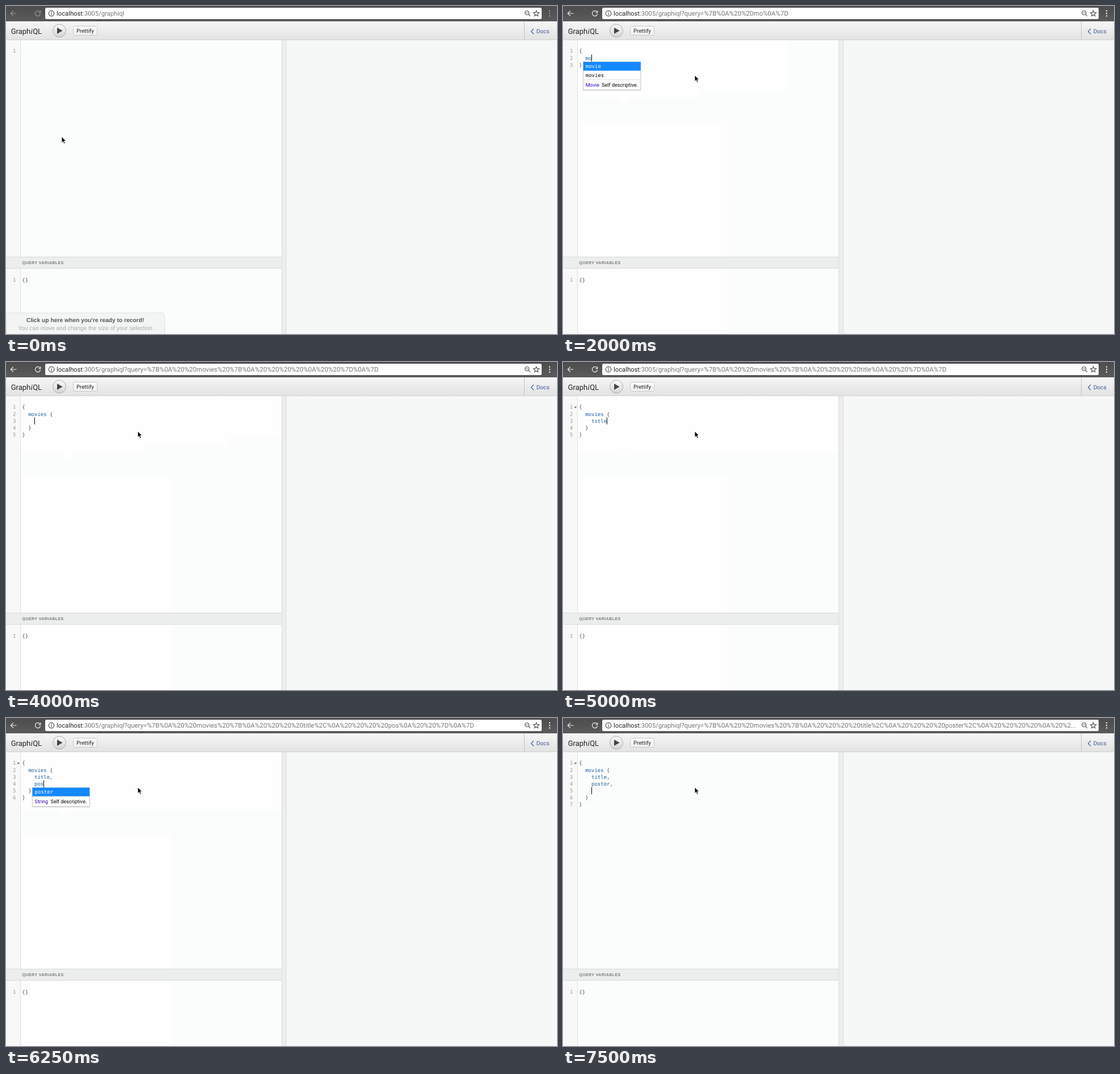
Animation, 970 px wide and 577 px high, one loop 8000 ms. Source, as an HTML page:

```html
<!DOCTYPE html>
<html lang="en">
<head>
<meta charset="utf-8">
<title>GraphiQL</title>
<style>
  html, body { margin: 0; width: 100%; height: 100%; overflow: hidden; background: #f6f8f8; }
  svg { display: block; width: 970px; height: 577px; text-rendering: geometricPrecision; }
  text { white-space: pre; font-family: Roboto, sans-serif; }
  .mono { font: 9px "DejaVu Sans Mono", monospace; fill: #555; }
  .num { fill: #999; text-anchor: end; }
  .field { fill: #1f61a0; }
  .hint { font: 10.25px "Liberation Sans", Arial, sans-serif; text-anchor: middle; }
  .line { fill: none; stroke-width: 1.2; }
</style>
</head>
<body>
<svg viewBox="0 0 970 577" xmlns="http://www.w3.org/2000/svg">
  <defs>
    <linearGradient id="chrome" x2="0" y2="1"><stop stop-color="#4c4c4c"/><stop offset="1" stop-color="#5b5b5b"/></linearGradient>
    <linearGradient id="bar" x2="0" y2="1"><stop stop-color="#f6f6f6"/><stop offset="1" stop-color="#e2e2e2"/></linearGradient>
    <linearGradient id="run" x2="0" y2="1"><stop stop-color="#fcfcfc"/><stop offset="1" stop-color="#d3d4d6"/></linearGradient>
    <linearGradient id="button" x2="0" y2="1"><stop stop-color="#fbfbfb"/><stop offset="1" stop-color="#f0f0f0"/></linearGradient>
  </defs>

  <!-- panes -->
  <rect width="970" height="577" fill="#f6f8f8"/>
  <rect y="60" width="485" height="517" fill="#fafdfb"/>
  <g id="wash" fill="#fdfefd"></g>
  <rect y="60" width="25" height="517" fill="#f7f8f7"/>
  <rect x="25" y="60" width="1" height="517" fill="#dfe1e0"/>
  <rect y="441" width="485" height="21" fill="#eceeed"/>
  <path d="M0 441.5H485M0 461.5H485" stroke="#d8dad9"/>
  <rect x="485" y="60" width="9" height="517" fill="#eceeed"/>
  <path d="M485.5 60V577M493.5 60V577" stroke="#dddfde"/>
  <text x="28.5" y="453.7" fill="#777" style="font:bold 7px 'Liberation Sans',Arial,sans-serif;letter-spacing:.45px">QUERY VARIABLES</text>
  <text class="mono num" x="17.3" y="484.7">1</text>
  <text class="mono" x="28.3" y="484.7">{}</text>

  <!-- browser bar -->
  <rect width="970" height="27" fill="url(#chrome)"/>
  <rect x="69" y="3" width="874" height="20" rx="2.5" fill="#fff"/>
  <g id="controls" class="line">
    <path d="M18.5 13H8.5M13 8.3L8.3 13L13 17.7"/>
    <path d="M59.6 10A4.6 4.6 0 1 0 60.6 14M60.8 8V11.6H57.2"/>
    <path d="M957 8.5h.01M957 13h.01M957 17.5h.01" stroke-width="2.4" stroke-linecap="round"/>
  </g>
  <g class="line" stroke="#555" stroke-width="1">
    <circle cx="80" cy="13" r="4.8"/><path d="M80 12.2V16M80 10V11.2"/>
    <circle cx="917.2" cy="12" r="3.5"/><path d="M919.8 14.6L923 17.8M915.4 12H919"/>
    <path d="M933.6 8L935 11.4L938.6 11.7L935.9 14.1L936.7 17.6L933.6 15.7L930.5 17.6L931.3 14.1L928.6 11.7L932.2 11.4Z"/>
  </g>
  <text x="89" y="17" font-size="11.25" fill="#777"><tspan fill="#222">localhost</tspan>:3005/graphiql</text>
  <text id="query" x="208" y="17" font-size="11.5" fill="#777"></text>

  <!-- toolbar -->
  <rect y="27" width="970" height="33" fill="url(#bar)"/>
  <path d="M0 59.5H970" stroke="#d0d0d0"/>
  <text x="8.7" y="48.8" font-size="13" fill="#222">Graph<tspan font-family="Liberation Serif, serif" font-style="italic" font-size="14">i</tspan>QL</text>
  <circle cx="94" cy="43.5" r="11.4" fill="url(#run)" stroke="#aaa"/>
  <path d="M90 38V49L99.5 43.5Z" fill="#444"/>
  <rect x="118.5" y="35.5" width="42" height="16" rx="2" fill="url(#button)" stroke="#c9c9c9"/>
  <text x="124" y="46.7" font-size="9.65" fill="#222">Prettify</text>
  <path d="M912.5 27V59" stroke="#c4c4c4"/>
  <path class="line" d="M929 40L924.5 44.7L929 49.4" stroke="#3b5998"/>
  <text x="933.7" y="48" font-size="10.15" fill="#3b5998">Docs</text>

  <g id="editor"></g>

  <g id="hint">
    <rect x=".5" y="540" width="279" height="45" rx="5" fill="#f3f5f4" stroke="#dfe1e0"/>
    <text class="hint" x="139.5" y="556.3" fill="#555" style="font-weight:bold">Click up here when you're ready to record!</text>
    <text class="hint" x="139.5" y="569.6" fill="#a8aaa9">You can move and change the size of your selection</text>
  </g>
  <path id="pointer" d="M0 0V10.4L2.4 8.2L4.1 12.2L5.9 11.4L4.2 7.5H7.4Z" fill="#000" stroke="#fff" stroke-width=".7"/>
</svg>

<script>
const LOOP = 8000, CHAR = 5.418, LEFT = 28.3, ROW = 12.15, BASE = 82.4;
const $ = id => document.getElementById(id);

const movie = { items: ['movie', 'movies'], active: 0, type: 'Movie' };
const movies = { ...movie, active: 1, type: '[Movie]' };
const title = { items: ['title', 'subtitle'], active: 0, type: 'String' };
const poster = { items: ['poster'], active: 0, type: 'String' };
const inMovies = body => `{\n  movies {\n    ${body}\n  }\n}`;

// "|" marks the caret; url overrides the address when it is out of step with the editor
const steps = [
  { at: 0, code: '' },
  { at: 1000, code: '{|}', url: '' },
  { at: 1250, code: '{|}' },
  { at: 1500, code: '{\n  |\n}' },
  { at: 2000, code: '{\n  mo|\n}', popup: movie },
  { at: 2250, code: '{\n  mov|\n}', popup: movie },
  { at: 2750, code: '{\n  mov|\n}', popup: movies },
  { at: 3250, code: '{\n  mov|\n}', popup: movies, url: '{\n  movies\n}' },
  { at: 3500, code: '{\n  movies|\n}' },
  { at: 3750, code: '{\n  movies {|}\n}' },
  { at: 4000, code: inMovies('|') },
  { at: 4500, code: inMovies('ti|'), popup: title },
  { at: 4750, code: inMovies('tit|'), popup: title },
  { at: 5000, code: inMovies('title|') },
  { at: 5500, code: inMovies('title,|') },
  { at: 5750, code: inMovies('title,\n    |') },
  { at: 6000, code: inMovies('title,\n    p|'), popup: poster },
  { at: 6250, code: inMovies('title,\n    pos|'), popup: poster },
  { at: 6500, code: inMovies('title,\n    poster|') },
  { at: 6750, code: inMovies('title,\n    poster |') },
  { at: 7250, code: inMovies('title,\n    poster,|') },
  { at: 7500, code: inMovies('title,\n    poster,\n    |') }
];

const pointerSteps = [
  { at: 0, x: 98, y: 230 }, { at: 250, x: 98, y: 188 }, { at: 500, x: 99, y: 157 },
  { at: 750, x: 106, y: 147 }, { at: 1000, x: 232, y: 122 }
];

// brighter areas of the left pane: start, left, top, right, bottom
const washes = [
  [250, 29, 203, 290, 577], [750, 98, 146, 115, 170], [1000, 29, 73, 241, 161],
  [1500, 26, 60, 380, 109], [2000, 26, 60, 395, 149], [4000, 26, 60, 485, 133],
  [4500, 26, 60, 485, 161]
];
const WASH_END = 7500;

const current = (table, t) => table.findLast(step => step.at <= t);
const rect = (x, y, w, h, attrs = '') => `<rect x="${x}" y="${y}" width="${w}" height="${h}" ${attrs}/>`;
const text = (x, y, body, attrs) => `<text x="${x}" y="${y}" ${attrs}>${body}</text>`;

function address(code) {
  if (!code) return '';
  const query = encodeURIComponent(code);
  return '?query=' + (query.length > 94 ? query.slice(0, 94) + '...' : query);
}

function drawPopup({ items, active, type }, x, y) {
  const descTop = y + 16 * items.length;
  const typeWidth = { Movie: 24, '[Movie]': 31, String: 23.5 }[type];
  const width = typeWidth + 77, height = descTop - y + 17;
  const rows = items.map((item, i) => {
    const top = y + 16 * i, on = i === active;
    return (on ? rect(x, top, width, 15.5, 'fill="#1389ff"') : '') +
      text(x + 4, top + 10.8, item, `class="mono" style="fill:${on ? '#fff' : '#000'}"`);
  });
  return rect(x - .7, y + .5, width + 1.4, height + 1.5, 'fill="#000" opacity=".12"') +
    rect(x, y, width, height, 'fill="#fff" stroke="#c4c4c4" stroke-width=".8"') + rows.join('') +
    rect(x, descTop - 1, width, 1, 'fill="#ddd"') +
    text(x + 4, descTop + 11.3, `<tspan fill="#30a">${type}</tspan><tspan x="${x + 8.5 + typeWidth}">Self descriptive.</tspan>`, 'font-size="9"');
}

function drawEditor({ at, code, popup }) {
  let caret = '', overlay = '';
  const lines = code.split('\n').map((line, i) => {
    const y = BASE + ROW * i, col = line.indexOf('|');
    if (col >= 0) {
      caret = rect(Math.round(LEFT + col * CHAR) - .1, y - 9.2, 1, 12.2, 'fill="#000"');
      if (popup) overlay = drawPopup(popup, LEFT + line.search(/\w/) * CHAR - 3.4, y + 3.7);
    }
    const body = line.replace('|', '').replace(/\w+/g, '<tspan class="field">$&</tspan>');
    return text(17.3, y, i + 1, 'class="mono num"') + text(LEFT, y, body, 'class="mono"');
  });
  const fold = at >= 4500 ? '<path d="M19.3 78.6H24.5L21.9 81.4Z" fill="#777"/>' : '';
  return lines.join('') + fold + caret + overlay;
}

let shown;
function draw(t) {
  const step = current(steps, t), { x, y } = current(pointerSteps, t);
  if (step !== shown) {
    shown = step;
    $('editor').innerHTML = drawEditor(step);
    $('query').textContent = address(step.url ?? step.code.replace('|', ''));
  }
  $('wash').innerHTML = washes.filter(([at]) => t >= at && t < WASH_END)
    .map(([, l, top, r, b]) => rect(l, top, r - l, b - top)).join('');
  $('pointer').setAttribute('transform', `translate(${x} ${y})`);
  $('hint').style.display = t < 250 ? '' : 'none';
  $('controls').style.stroke = t < 500 ? '#999' : '#eee';
}

const start = performance.now();
function tick() {
  draw((performance.now() - start) % LOOP);
  requestAnimationFrame(tick);
}
tick();
</script>
</body>
</html>
```
